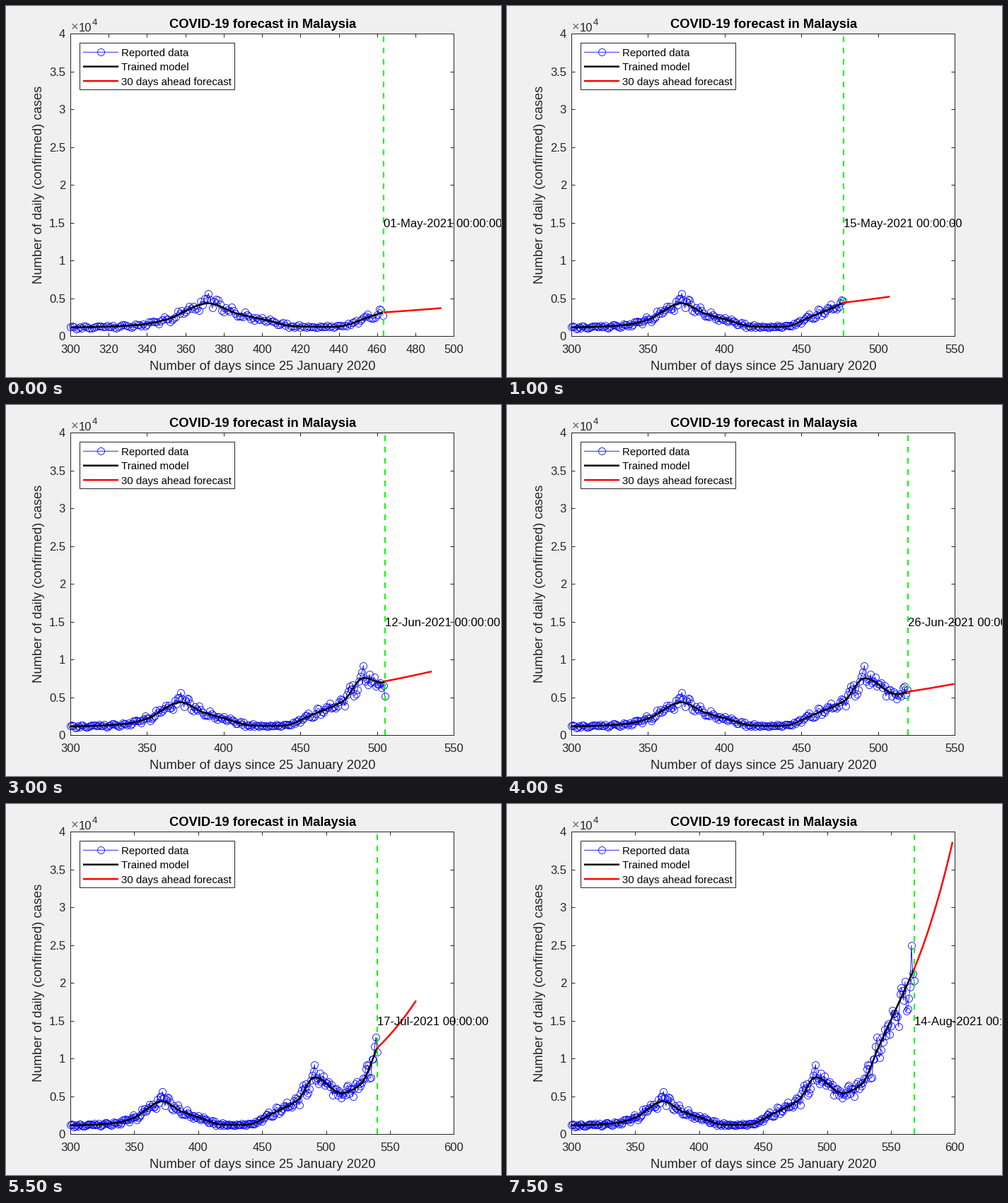
Animation, 700 px wide and 525 px high, one loop 8000 ms. Source, as a matplotlib script:

```python
import numpy as np
import matplotlib.pyplot as plt
from matplotlib.animation import FuncAnimation
from matplotlib.patches import Rectangle

W, H, DPI = 700, 525, 100
PT = 72 / DPI  # points per pixel
INK = "#262626"
THIN, THICK = 0.83 * PT, 2.5 * PT
FIRST, START, AHEAD, STEPS = 300, 463, 30, 16
MONTHS = {"May": 31, "Jun": 30, "Jul": 31, "Aug": 31}

plt.rcParams["font.family"] = "Liberation Sans"

# Turning points of the epidemic: (day, cases)
KEYS = [(300, 1150), (318, 1250), (337, 1530), (350, 2200), (372, 4350),
        (387, 2980), (400, 2250), (418, 1290), (438, 1240), (458, 2750),
        (478, 4550), (491, 7550), (512, 5430), (527, 6600), (540, 11400),
        (568, 21800)]


def monotone_curve(x, keys):
    """Cubic Hermite curve that stays flat at peaks and valleys."""
    kx, ky = np.array(keys, float).T
    h = np.diff(kx)
    slope = np.diff(ky) / h
    a, b = slope[:-1], slope[1:]
    same = a * b > 0
    inner = np.where(same, 2 * a * b / np.where(same, a + b, 1), 0)
    m = np.r_[slope[0], inner, slope[-1]]
    i = np.clip(np.searchsorted(kx, x, "right") - 1, 0, len(h) - 1)
    t = (x - kx[i]) / h[i]
    ease = t * t * (3 - 2 * t)
    return (ky[i] + (ky[i + 1] - ky[i]) * ease
            + h[i] * t * (1 - t) * (m[i] * (1 - t) - m[i + 1] * t))


def report(days, trend):
    """Scatter around the trend: weekly rhythm, noise and a surge per peak."""
    rng = np.random.default_rng(7)
    weekly = 0.08 * np.cos(2 * np.pi * (days - 6) / 7)
    noise = rng.uniform(-0.13, 0.13, days.size)
    surge = sum(0.22 * np.exp(-((days - peak) / 1.5) ** 2)
                for peak in (372, 491))
    return trend * (1 + weekly + noise + surge)


def growth(day):
    """Daily growth rate assumed by the forecast; rises in mid-July."""
    return 0.0055 + 0.0135 / (1 + np.exp((538 - day) / 3))


def date_label(day):
    for month, length in MONTHS.items():
        if day <= length:
            break
        day -= length
    return f"{day:02d}-{month}-2021 00:00:00"


days = np.arange(FIRST, START + 7 * (STEPS - 1) + 1)
trend = monotone_curve(days, KEYS)
cases = report(days, trend)

fig = plt.figure(figsize=(W / DPI, H / DPI), dpi=DPI, facecolor="#f0f0f0")
ax = fig.add_axes([0.13, 0.11, 542.4 / W, 0.815])
ax.set_ylim(0, 4e4)
ax.set_yticks(np.arange(0, 4.1e4, 5e3),
              [f"{v:g}" for v in np.arange(0, 4.1, 0.5)])
ax.tick_params(direction="in", top=True, right=True, length=5.4 * PT,
               width=PT, color=INK, labelcolor=INK, labelsize=16.67 * PT)
ax.tick_params(axis="x", pad=11.5 * PT)
ax.tick_params(axis="y", pad=7 * PT)
for spine in ax.spines.values():
    spine.set(color=INK, linewidth=PT)

# Overlay in pixel units for labels and legend
page = fig.add_axes([0, 0, 1, 1], zorder=5)
page.set(xlim=(0, W), ylim=(H, 0))
page.axis("off")


def label(x, y, text, px, color=INK, **kw):
    page.text(x, y, text, fontsize=px * PT, color=color, va="baseline", **kw)


label(363, 31, "COVID-19 forecast in Malaysia", 18.33, "black",
      ha="center", weight="bold")
label(362.7, 515, "Number of days since 25 January 2020", 18.33, ha="center")
label(51, 253.3, "Number of daily (confirmed) cases", 18.33, ha="center",
      rotation=90, rotation_mode="anchor")
label(92, 35.5, "×", 18, "#666666")
label(102.5, 35.5, "10", 16.67)
label(122, 27, "4", 13.3)

STYLES = {
    "Reported data": dict(color="blue", lw=THIN, marker="o", ms=10 * PT,
                          mfc="none", mew=THIN),
    "Trained model": dict(color="black", lw=THICK),
    "30 days ahead forecast": dict(color="red", lw=THICK),
}
page.add_patch(Rectangle((104, 52), 219, 66, fc="white", ec=INK, lw=PT))
for row, (name, style) in enumerate(STYLES.items()):
    y = 65.3 + 20.4 * row
    page.plot([109, 134, 159], [y] * 3, markevery=[1], snap=False,
              solid_capstyle="butt", **style)
    label(163, y + 5.5, name, 15, "black")

reported, model, forecast = (ax.plot([], [], **s)[0] for s in STYLES.values())
reported.set_clip_on(False)
today, = ax.plot([], [], color="lime", lw=2 * PT, ls=(0, (4, 4)))
stamp = ax.text(0, 15000, "", fontsize=16.67 * PT, color="black",
                va="center_baseline", zorder=6)


def draw(step):
    day = START + 7 * step
    n = day - FIRST + 1

    right = 50 * int(np.ceil((day + AHEAD) / 50))
    ax.set_xlim(FIRST, right)
    ax.set_xticks(np.arange(FIRST, right + 1, 20 if right == 500 else 50))

    # The fit lags behind while cases fall
    seen = days[:n]
    now = max(trend[n - 1], trend[n - 9])
    lag = (now - trend[n - 1]) * np.exp((seen - day) / 4)
    reported.set_data(seen, cases[:n])
    model.set_data(seen, trend[:n] + lag)

    u = np.arange(AHEAD + 1)
    forecast.set_data(day + u, now * np.exp(growth(day) * u))

    x = day + 0.3
    today.set_data([x, x], [0, 4e4])
    stamp.set_x(x)
    stamp.set_text(date_label(1 + 7 * step))
    return reported, model, forecast, today, stamp


anim = FuncAnimation(fig, draw, frames=STEPS, interval=500,
                     init_func=lambda: draw(0), repeat=True, repeat_delay=0)
plt.show()
```
